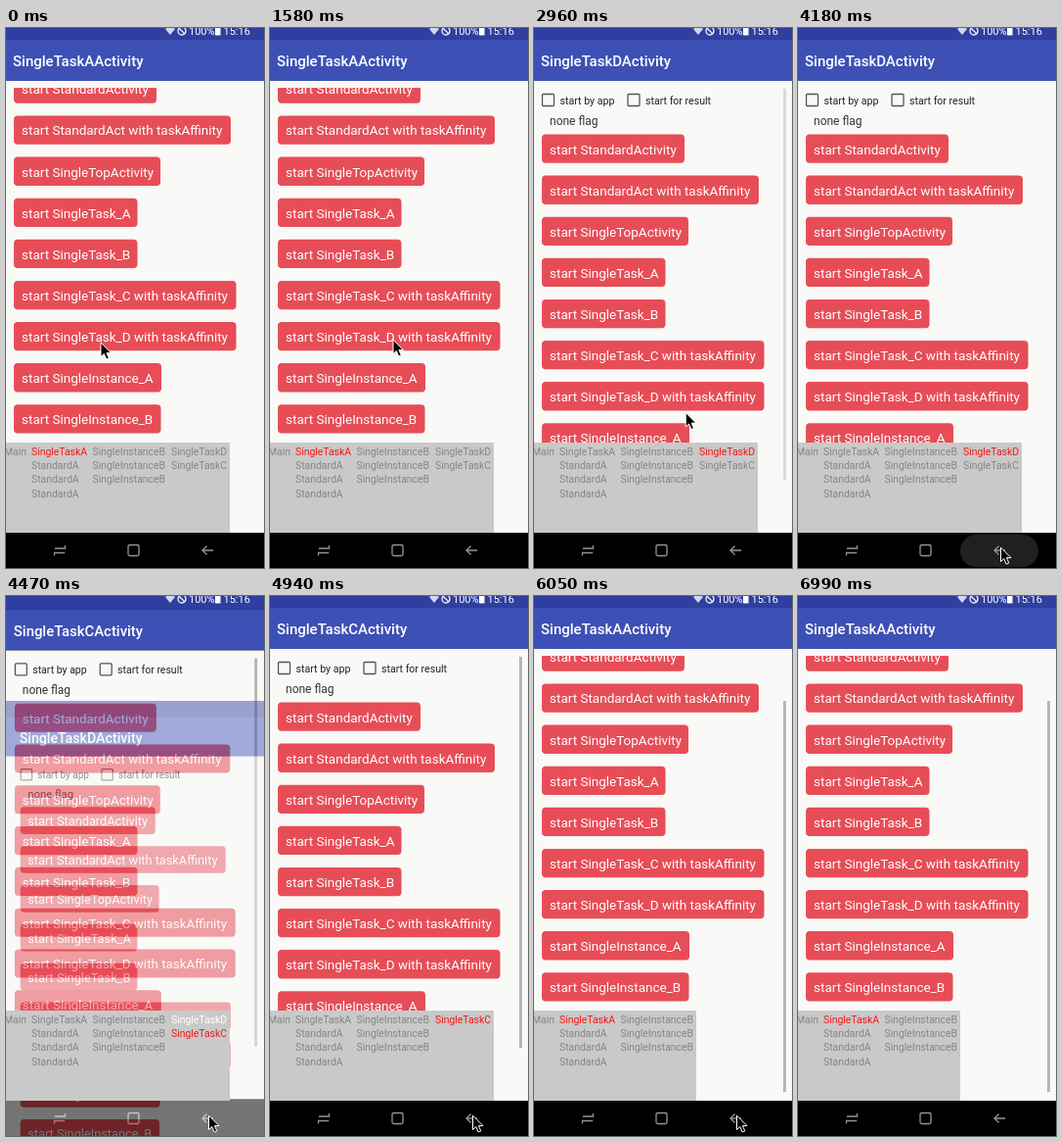
Write an HTML page that moves like this. It is 264 by 551 pixels and loops after 7090 ms.

```html
<!DOCTYPE html>
<html lang="en">
<head>
<meta charset="utf-8">
<title>Task stack demo</title>
<style>
html, body { margin: 0; width: 100%; height: 100%; overflow: hidden; background: #000; }
svg { display: block; font-family: Roboto, "Open Sans", sans-serif; }
.title { font-size: 15px; font-weight: 500; fill: #fff; }
.btn { font-size: 13.5px; fill: #fff; }
.label { font-size: 10.6px; fill: #222; }
.stack { font-size: 10.4px; fill: #858585; }
.status { font-size: 11px; fill: #fff; }
</style>
</head>
<body>
<svg id="stage" width="264" height="551" viewBox="0 0 264 551">
  <rect width="264" height="551"/>
  <rect id="ripple" x="166" y="517" width="80" height="33" rx="16.5" fill="#202020"/>
  <g fill="none" stroke="#959595" stroke-width="1.3">
    <path d="M50 531h10.5v-3M60 535.5h-10.5v3"/>
    <rect x="125" y="527.5" width="11" height="11" rx="1.5"/>
    <path d="M212 533h-11m4.5-4.5l-4.5 4.5 4.5 4.5"/>
  </g>
  <g id="pages"></g>
  <g class="status">
    <path d="M163 1q5-4 10 0l-5 6z" opacity=".8"/>
    <g fill="none" stroke="#fff" stroke-width="1.3">
      <circle cx="180" cy="3" r="4"/><path d="M177 0l6 6"/>
    </g>
    <text x="187" y="7.3">100%</text>
    <rect x="214" y="-1" width="5.5" height="8.5"/>
    <text x="222.5" y="7.3">15:16</text>
  </g>
  <g id="panel" class="stack"></g>
  <path id="cursor" d="M0 0v14.5l3.3-3 2.4 5.5 2.6-1.1-2.4-5.3h4.6z" fill="#000" stroke="#fff" stroke-width="1"/>
</svg>
<script>
const LOOP = 7090, CX = 132, CY = 272;
const NS = 'http://www.w3.org/2000/svg';
const $ = id => document.getElementById(id);

function add(parent, tag, attrs, text) {
  const el = document.createElementNS(NS, tag);
  for (const k in attrs) el.setAttribute(k, attrs[k]);
  if (text) el.textContent = text;
  parent.appendChild(el);
  return el;
}

// label, right edge
const BUTTONS = [
  ['StandardActivity', 154], ['StandardAct with taskAffinity', 230],
  ['SingleTopActivity', 158], ['SingleTask_A', 134.5], ['SingleTask_B', 134.5],
  ['SingleTask_C with taskAffinity', 235.5], ['SingleTask_D with taskAffinity', 235.5],
  ['SingleInstance_A', 159], ['SingleInstance_B', 158.5]
].map(([name, right]) => ['start ' + name, right]).concat([['show alert dialog', 127]]);

function checkbox(parent, x, label) {
  add(parent, 'rect', { x: x + .5, y: 67.5, width: 12, height: 12, rx: 1, fill: 'none', stroke: '#555', 'stroke-width': 1.3 });
  add(parent, 'text', { x: x + 18.5, y: 78, class: 'label' }, label);
}

function makePage(letter, scroll, barY) {
  const g = add($('pages'), 'g');
  // the bands overhang the sides so a shrunken page still spans the stage
  const band = (y, height, fill) => add(g, 'rect', { x: -12, y, width: 288, height, fill });
  band(-6, 18, '#303f9f');
  band(12, 42, '#3c50b5');
  band(54, 461, '#f9f9f7');
  add(g, 'text', { x: 7, y: 39, class: 'title' }, `SingleTask${letter}Activity`);
  const view = add(g, 'svg', { y: 61, width: 264, height: 446 });
  const list = add(view, 'g', { transform: `translate(0 ${-61 - scroll})` });
  checkbox(list, 8, 'start by app');
  checkbox(list, 95.5, 'start for result');
  add(list, 'text', { x: 16, y: 99, 'font-size': 12, fill: '#333' }, 'none flag');
  BUTTONS.forEach(([label, right], i) => {
    const y = 108.5 + 42.1 * i;
    add(list, 'rect', { x: 8, y, width: right - 8, height: 29.3, rx: 4, fill: '#e74d57' });
    add(list, 'text', { x: 16, y: y + 20, class: 'btn' }, label);
  });
  const bar = add(g, 'rect', { x: 255, y: barY, width: 3, height: 399, fill: '#b6b6b6' });
  return { g, bar };
}

const pageC = makePage('C', 0, 62);
const pageA = makePage('A', 61.1, 107);
const pageD = makePage('D', 0, 62);

const panel = $('panel');
const panelBox = add(panel, 'rect', { y: 423, height: 92, fill: '#c9c9c9' });
const cell = (x, row, text) => add(panel, 'text', { x, y: 436 + 14.2 * row }, text);
cell(-2, 0, 'Main');
const cellA = cell(26, 0, 'SingleTaskA');
for (let r = 1; r < 4; r++) cell(26, r, 'StandardA');
for (let r = 0; r < 3; r++) cell(88.5, r, 'SingleInstanceB');
const top1 = cell(169, 0, ''), top2 = cell(169, 1, 'SingleTaskC');

// from time: width, A colour, top label, its colour, second row colour
const RED = '#f01818', GRAY = '#858585', WHITE = '#fff', NONE = 'none';
const STACK = [
  [0, 229, RED, 'D', GRAY, GRAY],
  [2200, 229, WHITE, 'D', RED, GRAY],
  [2600, 229, GRAY, 'D', RED, GRAY],
  [4300, 229, GRAY, 'D', WHITE, RED],
  [4620, 229, GRAY, 'C', RED, NONE],
  [5520, 229, RED, 'C', WHITE, NONE],
  [5900, 166, RED, 'C', NONE, NONE]
];

// time, x, y of the pointer tip
const PATH = [
  [0, 97, 321], [170, 97, 321], [290, 99, 313], [470, 99, 313], [760, 117, 281],
  [940, 116, 281], [1120, 116, 281], [1580, 126, 318], [2740, 126, 318],
  [3360, 208, 527], [3540, 208, 527], [3660, 207.5, 530], [6380, 207.5, 530],
  [6500, 178, 534], [6640, 155, 553], [LOOP, 155, 570]
];

const ramp = (t, from, len) => Math.min(1, Math.max(0, (t - from) / len));
const ease = p => 1 - (1 - p) ** 3;
const mix = (a, b, p) => a + (b - a) * p;

function place({ g }, alpha, scale = 1, dy = 0) {
  g.style.display = alpha > 0 ? '' : 'none';
  g.setAttribute('opacity', alpha);
  g.setAttribute('transform', `translate(${CX} ${CY + dy}) scale(${scale}) translate(${-CX} ${-CY})`);
}

function drawPages(t) {
  const open = ramp(t, 2200, 360), pop = ramp(t, 4300, 320), back = ramp(t, 5520, 360);
  const eo = ease(open), ep = ease(pop), eb = ease(back);

  if (t < 5520) place(pageA, open < 1 ? 1 : 0, mix(1, .93, eo));
  else place(pageA, back, mix(.97, 1, eb), mix(63, 0, eb));

  if (pop > 0) place(pageD, 1 - pop, mix(1, .94, ep), mix(0, 109, ep));
  else place(pageD, Math.min(1, open * 1.67), mix(.94, 1, eo), mix(109, 0, eo));

  const shrink = back > 0 ? mix(1, .93, eb) : mix(.93, 1, ep);
  place(pageC, pop > 0 && back < 1 ? mix(1, .7, eb) : 0, shrink);

  pageA.bar.setAttribute('opacity', t < 5520 ? 0 : 1);
  pageD.bar.setAttribute('opacity', 1 - ramp(t, 2800, 300));
}

function drawPanel(t) {
  const [, width, colA, top, colTop, colNext] = STACK.filter(s => s[0] <= t).pop();
  panelBox.setAttribute('width', width);
  cellA.setAttribute('fill', colA);
  top1.textContent = 'SingleTask' + top;
  top1.setAttribute('fill', colTop);
  top2.setAttribute('fill', colNext);
}

function drawCursor(t) {
  const i = PATH.findIndex(k => k[0] > t);
  const a = PATH[i - 1], b = PATH[i], p = (t - a[0]) / (b[0] - a[0]);
  $('cursor').setAttribute('transform', `translate(${mix(a[1], b[1], p)} ${mix(a[2], b[2], p)})`);
}

function draw(t) {
  drawPages(t);
  drawPanel(t);
  drawCursor(t);
  const press = (from, to) => ramp(t, from, 160) * (1 - ramp(t, to, 220));
  $('ripple').setAttribute('opacity', Math.max(press(3960, 4240), press(5140, 5400)));
}

const start = performance.now();
function tick() {
  draw((performance.now() - start) % LOOP);
  requestAnimationFrame(tick);
}
tick();
</script>
</body>
</html>
```
